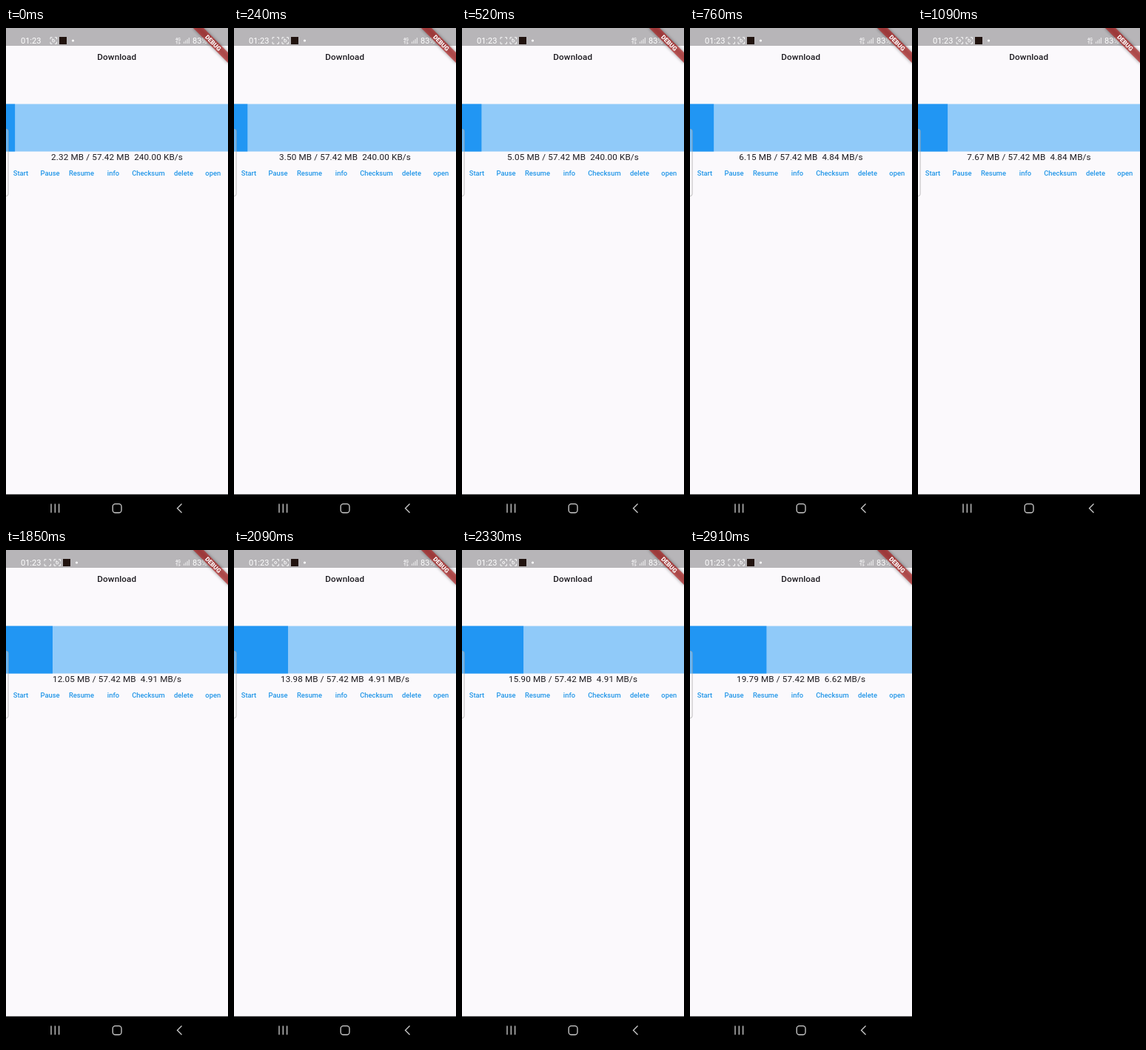
An HTML page for the animation above (3000 ms loop, 300 by 666 pixels).

```html
<!DOCTYPE html>
<html lang="en">
<head>
<meta charset="utf-8">
<title>Download</title>
<style>
  html, body { margin: 0; width: 100%; height: 100%; overflow: hidden; background: #fbf9fc; }
  svg { display: block; width: 100%; height: 100%; }
  text { font-family: Roboto, "Open Sans", sans-serif; white-space: pre; }
  .mid { text-anchor: middle; }
  .status { font-size: 11px; fill: #fff; }
  .body { font-size: 11.7px; letter-spacing: .14px; fill: #1d1b20; }
  .title { font-size: 11.7px; font-weight: 500; letter-spacing: .1px; fill: #1d1b20; }
  .button { font-size: 9.4px; font-weight: 500; fill: #2196e8; }
  .line { fill: none; stroke: #fff; stroke-width: .9; }
  .nav { fill: none; stroke: #d0d0d0; stroke-width: 1.3; }
</style>
</head>
<body>
<svg viewBox="0 0 300 666">
  <defs>
    <path id="corners" d="M0 2.5V0H2.5M6 0H8.5V2.5M8.5 6V8.5H6M2.5 8.5H0V6"/>
    <filter id="soft" x="-20%" y="-100%" width="140%" height="300%"><feGaussianBlur stdDeviation="2"/></filter>
    <clipPath id="screen"><rect width="300" height="666"/></clipPath>
  </defs>
  <rect width="300" height="666" fill="#fbf9fc"/>
  <rect width="300" height="24" fill="#b7b5b8"/>

  <text class="status" x="20" y="20.5">01:23</text>
  <g class="line" id="record" transform="translate(52 12.7)">
    <use href="#corners"/>
    <circle id="pulse" cx="4.25" cy="4.25" r="1.5"/>
  </g>
  <g id="notices">
    <g class="line" transform="translate(65 12.7)">
      <use href="#corners"/>
      <circle cx="4.25" cy="4.6" r="1.6"/>
      <path d="M2 2.4H4"/>
    </g>
    <rect x="77" y="12" width="10" height="10" fill="#21130f"/>
    <circle cx="95.5" cy="17" r="1.6" fill="#fff"/>
  </g>

  <text class="mid" x="232.5" y="16.5" font-size="5.5" font-weight="500" fill="#fff">4G</text>
  <path class="line" d="M231 21.5V17.5L229.5 19M234 17.5V21.5L235.5 20" style="stroke-width:.8"/>
  <path d="M240.5 21V18.5M242.8 21V16.8M245.1 21V15M247.4 21V13" stroke="#fff" stroke-opacity=".65" stroke-width="1.2"/>
  <text class="status" x="252" y="20.5">83%</text>
  <path class="line" d="M275 13.5H279.5V21H275ZM276.3 12.4H278.2"/>

  <text class="title mid" x="149.8" y="43">Download</text>
  <rect y="102.5" width="300" height="64" fill="#90caf9"/>
  <rect id="bar" y="102.5" height="64" fill="#2196f3"/>
  <text class="body mid" id="amount" x="150" y="177.5"></text>
  <g id="buttons"></g>
  <rect x="-6" y="136.5" width="9" height="90" rx="2.5" fill="#fff" fill-opacity=".3" stroke="#aaa" stroke-opacity=".75"/>

  <g clip-path="url(#screen)">
    <g transform="translate(300 0) rotate(45)">
      <rect x="-34" y="23.3" width="68" height="10" fill="#000" fill-opacity=".4" filter="url(#soft)"/>
      <rect x="-34" y="23.3" width="68" height="10" fill="#b71c1c" fill-opacity=".63"/>
      <text class="mid" y="31.3" font-size="8.3" font-weight="900" fill="#fff">DEBUG</text>
    </g>
  </g>

  <rect y="628.7" width="300" height="37.3" fill="#000"/>
  <path class="nav" d="M61 641.5V653.5M66.3 641.5V653.5M71.6 641.5V653.5"/>
  <rect class="nav" x="144.2" y="641.7" width="11.8" height="11.8" rx="3.5"/>
  <path class="nav" d="M237.5 641.5L231.5 647.5L237.5 653.5"/>
</svg>
<script>
  const LOOP = 3000, STEP = 30, TOTAL = 57.42;
  // [time in ms, megabytes received]
  const progress = [[0, 2.32], [30, 2.32], [520, 5.05], [1090, 7.67], [1200, 7.67], [1580, 10.36],
                    [1850, 12.05], [2330, 15.9], [2400, 15.9], [2910, 19.79], [3000, 19.79]];
  const speeds = [[0, "240.00 KB/s"], [570, "4.84 MB/s"], [1560, "4.91 MB/s"], [2550, "6.62 MB/s"]];
  const labels = [["Start", 20], ["Pause", 59.6], ["Resume", 102], ["info", 145],
                  ["Checksum", 192.4], ["delete", 240], ["open", 279.8]];

  const get = id => document.getElementById(id);
  const bar = get("bar"), amount = get("amount"), record = get("record");
  const pulse = get("pulse"), notices = get("notices");

  for (const [label, x] of labels) {
    const text = document.createElementNS("http://www.w3.org/2000/svg", "text");
    text.setAttribute("class", "button mid");
    text.setAttribute("x", x);
    text.setAttribute("y", 198.5);
    text.textContent = label;
    get("buttons").append(text);
  }

  const clamp = v => Math.max(0, Math.min(1, v));

  function received(t) {
    const i = progress.findIndex(([time]) => time > t);
    const [t0, a] = progress[i - 1], [t1, b] = progress[i];
    return a + (b - a) * (t - t0) / (t1 - t0);
  }

  function draw(time) {
    const t = time % LOOP;
    const mb = received(Math.floor(t / 10 / 3 + 1e-6) * STEP > t - 10 ? t : Math.floor(t / 10) * 10);
    const speed = speeds.filter(([start]) => start <= t).pop()[1];
    bar.setAttribute("width", 300 * mb / TOTAL);
    amount.textContent = `${mb.toFixed(2)} MB / ${TOTAL} MB  ${speed}`;

    // The recording icon slides in, then blinks once a second.
    const enter = 1 - (1 - clamp((t - STEP) / 220)) ** 2;
    notices.setAttribute("transform", `translate(${-5 * (1 - enter)} 0)`);
    record.setAttribute("opacity", enter);
    pulse.setAttribute("opacity", t >= 1000 && t % 1000 < 500 ? 1 : 0);
  }

  const start = performance.now();
  function tick() {
    draw(performance.now() - start);
    requestAnimationFrame(tick);
  }
  tick();
</script>
</body>
</html>
```
